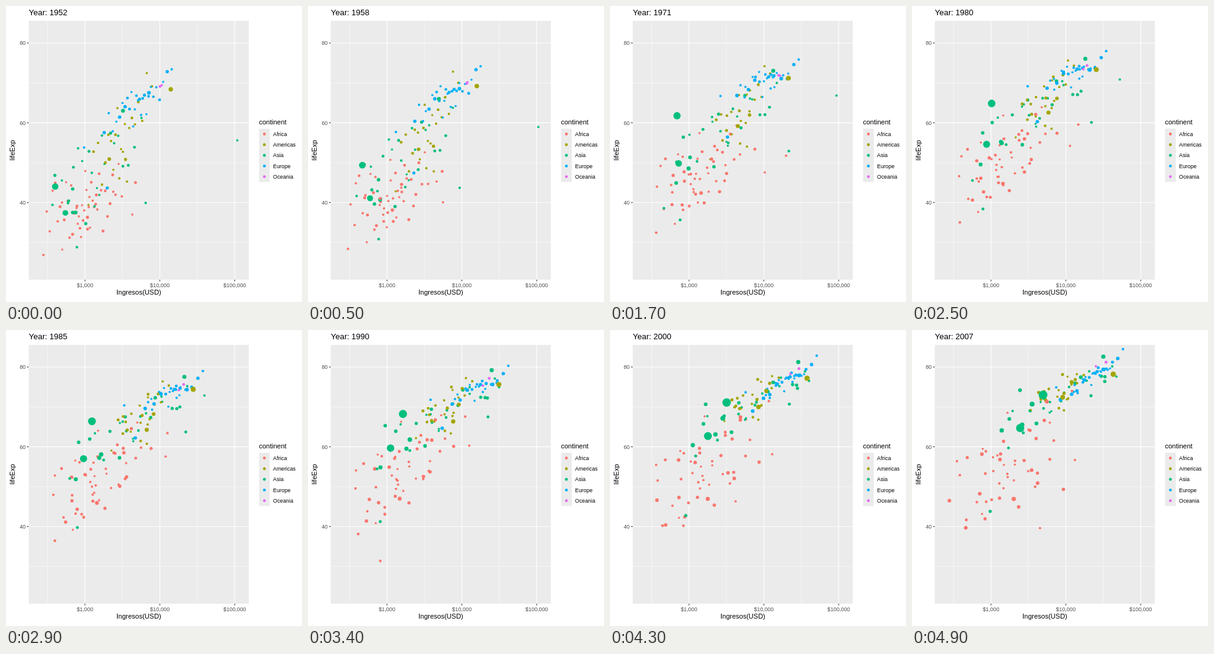
An HTML page that plays this animation: 480 px wide and 480 px high, repeating every 5000 ms.

```html
<!DOCTYPE html>
<html lang="es">
<head>
<meta charset="utf-8">
<style>
html, body { margin: 0; width: 100%; height: 100%; overflow: hidden; background: #fff; }
svg { display: block; width: 100vw; height: 100vh; font-family: "Liberation Sans", Arial, sans-serif; }
</style>
</head>
<body>
<svg id="stage" viewBox="0 0 480 480"></svg>
<script>
const FRAMES = 50, STEP = 100;
const COLORS = { Africa: "#F8766D", Americas: "#A3A500", Asia: "#00BF7D", Europe: "#00B0F6", Oceania: "#E76BF3" };
const PANEL = { left: 36.9, right: 393.8, top: 24.1, bottom: 443.8 };
const stage = document.getElementById("stage");
const dots = [];

const xPos = logIncome => 128.1 + 121.4 * (logIncome - 3);
const yPos = life => 60 + 6.467 * (80 - life);
const radius = millions => 1.77 + 5.33 * Math.sqrt(millions / 1319);

function el(tag, attrs, text) {
  const node = document.createElementNS("http://www.w3.org/2000/svg", tag);
  for (const k in attrs) node.setAttribute(k, attrs[k]);
  if (text) node.textContent = text;
  return stage.appendChild(node);
}
const rect = (x, y, width, height) => el("rect", { x, y, width, height, fill: "#EBEBEB" });
const line = (x1, y1, x2, y2, stroke, width) => el("line", { x1, y1, x2, y2, stroke, "stroke-width": width });
const label = (x, y, size, text, fill = "#000", anchor = "start") =>
  el("text", { x, y, "font-size": size, fill, "text-anchor": anchor }, text);
const vGrid = (log, width) => line(xPos(log), PANEL.top, xPos(log), PANEL.bottom, "#fff", width);
const hGrid = (life, width) => line(PANEL.left, yPos(life), PANEL.right, yPos(life), "#fff", width);

// Value at u (0 to 1) on a line through evenly spaced key values.
function at(keys, u) {
  const p = u * (keys.length - 1);
  const k = Math.min(Math.floor(p), keys.length - 2);
  return keys[k] + (keys[k + 1] - keys[k]) * (p - k);
}

let seed = 1952;
function random() {
  seed = (seed + 0x6D2B79F5) | 0;
  let t = Math.imul(seed ^ (seed >>> 15), 1 | seed);
  t = (t + Math.imul(t ^ (t >>> 7), 61 | t)) ^ t;
  return ((t ^ (t >>> 14)) >>> 0) / 4294967296;
}

// Maps 0..1 to a bounded bell-like deviation with unit variance.
function bell(p) {
  const s = 2 * p - 1;
  return 1.2 * s + 0.9 * s ** 3;
}

function addDot(continent, population, income, life) {
  const node = el("circle", { fill: COLORS[continent] });
  const size = population.map(radius);
  dots.push({ node, income, life, size: u => at(size, u) });
}

// A country on its own path: population in millions, income in dollars, life in years.
function country(continent, population, income, life) {
  const logs = income.map(Math.log10);
  addDot(continent, population, u => at(logs, u), u => at(life, u));
}

// Countries scattered around a continent's mean path; richer ones live longer.
function cloud(continent, count, { largest, income, spread, life, rise, scatter }) {
  const logs = income.map(Math.log10);
  for (let i = 0; i < count; i++) {
    const z0 = bell((i + 0.5) / count), w0 = bell(random());
    const wealth = [z0, 0.85 * z0 + 0.25 * bell(random())];
    const health = [w0, 0.6 * w0 + 0.6 * bell(random())];
    const share = random() ** 3;
    addDot(continent, largest.map(n => n * share),
      u => at(logs, u) + at(spread, u) * at(wealth, u),
      u => at(life, u) + at(rise, u) * at(wealth, u) + at(scatter, u) * at(health, u));
  }
}

rect(PANEL.left, PANEL.top, PANEL.right - PANEL.left, PANEL.bottom - PANEL.top);
[2.5, 3.5, 4.5].forEach(v => vGrid(v, 0.53));
[30, 50, 70].forEach(v => hGrid(v, 0.53));
[3, 4, 5].forEach(v => vGrid(v, 1.07));
[40, 60, 80].forEach(v => hGrid(v, 1.07));

cloud("Africa", 44, {
  largest: [20, 70], income: [930, 1250, 1380, 1480], spread: [0.26, 0.39],
  life: [39, 46.5, 53.8, 54.8], rise: [1.5, 3, 5, 4.5], scatter: [4.5, 6.5]
});
cloud("Asia", 22, {
  largest: [30, 85], income: [1500, 3400, 5600, 8000], spread: [0.3, 0.42],
  life: [47.5, 58.5, 67.5, 72], rise: [3.5, 4.5], scatter: [6.5, 3]
});
cloud("Americas", 22, {
  largest: [15, 45], income: [2950, 4900, 5900, 8200], spread: [0.22, 0.23],
  life: [53, 60.5, 68.5, 73.4], rise: [5.5, 2], scatter: [6, 2.6]
});
cloud("Europe", 27, {
  largest: [50, 62], income: [5100, 10700, 15900, 24000], spread: [0.23, 0.18],
  life: [65.3, 70.7, 74.5, 77.9], rise: [4, 2, 2, 2.5], scatter: [2.6, 1.1]
});

// The largest countries and those that leave the crowd
country("Asia", [8, 32], [779, 760, 800, 975], [28.8, 35.4, 41, 43.8]);
country("Asia", [47, 150], [684, 670, 780, 1391], [37.5, 44.5, 54, 64.1]);
country("Asia", [5, 14], [368, 455, 684, 1714], [39.4, 43.8, 36.7, 52.7, 56.4, 59.7]);
country("Asia", [556, 1319], [400, 670, 1480, 4959], [44, 61.5, 67.8, 73]);
country("Asia", [372, 1110], [547, 717, 1040, 2452], [37.4, 49.4, 59.2, 64.7]);
country("Asia", [82, 224], [750, 960, 1920, 3541], [37.5, 48, 61, 70.7]);
country("Asia", [86, 127], [3217, 13000, 24500, 31656], [63, 72.8, 78.9, 82.6]);
country("Asia", [0.2, 2.5], [108382, 98000, 30300, 47307], [55.6, 66.5, 74.7, 77.6]);
country("Asia", [41, 169], [685, 1010, 1760, 2606], [43.4, 51, 59, 65.5]);
country("Asia", [4, 28], [6460, 21500, 22400, 21655], [39.9, 52.3, 67, 72.8]);
country("Asia", [26, 85], [605, 680, 870, 2442], [40.4, 49.5, 64.5, 74.2]);
country("Africa", [14, 65], [781, 880, 620, 278], [39.1, 45.3, 46.8, 46.5]);
country("Africa", [22, 80], [1419, 1950, 3850, 5581], [41.9, 50.5, 60.8, 71.3]);
country("Africa", [0.4, 1.5], [4293, 10200, 12500, 13206], [37, 47, 60.6, 56.7]);
country("Africa", [1, 6], [2388, 20300, 11000, 12057], [42.7, 51.1, 67, 74]);
country("Africa", [33, 135], [1077, 1450, 1440, 2014], [36.3, 42.2, 47, 46.9]);
country("Africa", [3, 9], [493, 570, 810, 863], [40, 42.6, 44.1, 44.8, 45.6, 29, 39.2, 46.2]);
country("Africa", [14, 44], [4725, 7580, 7650, 9270], [45, 50.5, 54.4, 59.8, 60.5, 49.3]);
country("Africa", [0.3, 1], [1148, 3050, 3700, 4513], [41.4, 49, 57.9, 39.6]);
country("Europe", [3, 5], [974, 2600, 3600, 7446], [53.8, 66.5, 71.5, 74.9]);
country("Europe", [69, 82], [7144, 16800, 25200, 32170], [67.5, 70.9, 75.3, 79.4]);
country("Europe", [22, 71], [1969, 3200, 5250, 8458], [43.6, 56.1, 64, 71.8]);
country("Americas", [57, 190], [2109, 4400, 7550, 9066], [50.9, 58.9, 65.8, 72.4]);
country("Americas", [30, 109], [3478, 6350, 8900, 11978], [50.8, 61.6, 70.1, 76.2]);
country("Americas", [158, 301], [13990, 21000, 30300, 42952], [68.4, 71, 75.4, 78.2]);
country("Oceania", [9, 20], [10040, 16100, 22400, 34435], [69.1, 71.6, 76.8, 81.2]);
country("Oceania", [2, 4], [10557, 15500, 18700, 25185], [69.4, 71.8, 74.9, 80.2]);

// Axes, legend and title
["$1,000", "$10,000", "$100,000"].forEach((text, i) => {
  const x = xPos(3 + i);
  line(x, PANEL.bottom, x, PANEL.bottom + 2.74, "#333", 1.07);
  label(x, 456, 8.8, text, "#4D4D4D", "middle");
});
[40, 60, 80].forEach(v => {
  line(PANEL.left - 2.74, yPos(v), PANEL.left, yPos(v), "#333", 1.07);
  label(32, yPos(v) + 3.2, 8.8, String(v), "#4D4D4D", "end");
});
label(215.4, 468.4, 11, "Ingresos(USD)", "#000", "middle");
label(0, 0, 11, "lifeExp", "#000", "middle").setAttribute("transform", "translate(13.5 234) rotate(-90)");

label(410.2, 192, 11, "continent");
rect(410.4, 199, 17.28, 86.4);
Object.keys(COLORS).forEach((name, i) => {
  const cy = 207.6 + 17.28 * i;
  el("circle", { cx: 419, cy, r: 2.3, fill: COLORS[name] });
  label(433.1, cy + 3.2, 8.8, name);
});
const title = label(37, 15, 13, "Year: 1952");

function draw(frame) {
  const u = frame / (FRAMES - 1);
  title.textContent = "Year: " + Math.round(1952 + 55 * u);
  for (const { node, income, life, size } of dots) {
    node.setAttribute("cx", xPos(income(u)).toFixed(2));
    node.setAttribute("cy", yPos(life(u)).toFixed(2));
    node.setAttribute("r", size(u).toFixed(2));
  }
}

const start = performance.now();
let shown = -1;
function tick() {
  const frame = Math.floor((performance.now() - start) / STEP) % FRAMES;
  if (frame !== shown) draw(shown = frame);
  requestAnimationFrame(tick);
}
tick();
</script>
</body>
</html>
```
